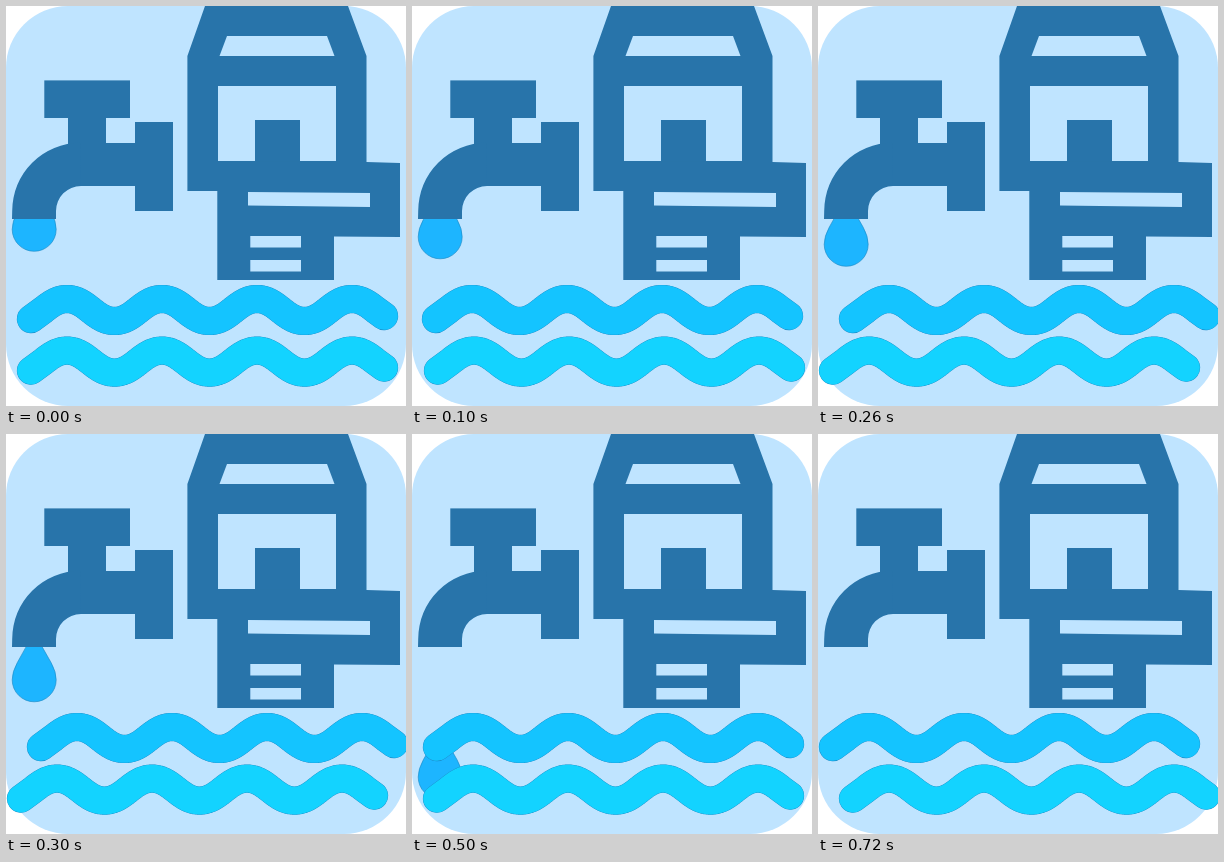
Animation of 400x400 px, one loop 800 ms. Source, as an HTML page with a canvas:

```html
<!DOCTYPE html>
<html lang="en">
<head>
<meta charset="utf-8">
<title>Water supply</title>
<style>
html, body { margin: 0; width: 100%; height: 100%; overflow: hidden; background: #fff; }
canvas { display: block; width: 400px; height: 400px; }
</style>
</head>
<body>
<canvas id="stage"></canvas>
<script>
const LOOP = 800, STEP = 100, LAST = 6;
const SKY = '#bfe4ff', STEEL = '#2874aa', EDGE = '#1c86c2';
const WAVES = [
  { mid: 304, color: '#14c4ff', sway: [0, -1, 10, 10, -1, 0, -10] },
  { mid: 355.6, color: '#13d3ff', sway: [0, 1, -10, -10, -1, 0, 10] }
];

const canvas = document.getElementById('stage');
const ctx = canvas.getContext('2d');
const ratio = window.devicePixelRatio || 1;
canvas.width = canvas.height = 400 * ratio;
ctx.scale(ratio, ratio);

function poly(color, ...xy) {
  ctx.beginPath();
  for (let i = 0; i < xy.length; i += 2) ctx.lineTo(xy[i], xy[i + 1]);
  ctx.closePath();
  ctx.fillStyle = color;
  ctx.fill();
}

function box(color, x1, y1, x2, y2) {
  ctx.fillStyle = color;
  ctx.fillRect(x1, y1, x2 - x1, y2 - y1);
}

function backdrop() {
  box('#fff', 0, 0, 400, 400);
  ctx.beginPath();
  ctx.roundRect(0, 0, 400, 400, 62);
  ctx.fillStyle = SKY;
  ctx.fill();
}

function plant() {
  poly(STEEL, 199, 0, 342, 0, 360.5, 50, 360.5, 156, 394, 157, 394, 231,
    328, 230.5, 328, 274, 211.3, 274, 211.3, 185, 181.4, 185, 181.4, 50);
  poly(SKY, 221, 30, 321, 30, 328.5, 50, 213.5, 50);
  box(SKY, 212, 80, 330, 155);
  box(STEEL, 249, 114, 294, 155.5);
  poly(SKY, 242, 186, 364, 187, 364, 201, 242, 199.5);
  for (const y of [230, 254]) box(SKY, 244.3, y, 295, y + 11.5);
}

function tap() {
  box(STEEL, 38.3, 74.4, 124, 112);
  box(STEEL, 62, 111, 100, 150);
  box(STEEL, 74, 137, 130, 180);
  box(STEEL, 129, 116, 167, 205);
  // Spout: quarter bend ending in a short straight mouth
  ctx.beginPath();
  ctx.moveTo(6, 213);
  ctx.arc(74.5, 205, 68.3, Math.PI, Math.PI * 1.5);
  ctx.arc(75, 205, 25, Math.PI * 1.5, Math.PI, true);
  ctx.lineTo(50, 213);
  ctx.closePath();
  ctx.fillStyle = STEEL;
  ctx.fill();
}

// Swells slowly at the mouth, then falls in large strides
function dropHeight(step) {
  return step < 4 ? 223.3 + 7.5 * step : 294 + 49 * (step - 4);
}

function drop(y) {
  ctx.save();
  ctx.translate(28.2, y);
  ctx.beginPath();
  ctx.moveTo(0, -47);
  ctx.lineTo(17, -17);
  ctx.quadraticCurveTo(22, -8, 22, 0);
  ctx.arc(0, 0, 22, 0, Math.PI);
  ctx.quadraticCurveTo(-22, -8, -17, -17);
  ctx.closePath();
  ctx.fillStyle = '#1db5ff';
  ctx.fill();
  ctx.strokeStyle = EDGE;
  ctx.lineWidth = 0.6;
  ctx.stroke();
  ctx.restore();
}

// Slightly flattened sine with straight ends
function wave(shift, mid, color) {
  const period = 95, crest = 61;
  ctx.beginPath();
  ctx.moveTo(25 + shift, mid + 9);
  for (let x = crest - period / 4; x <= crest + period * 3.25; x += 0.5) {
    const a = (x - crest) * 2 * Math.PI / period;
    ctx.lineTo(x + shift, mid - 11.2 * (Math.cos(a) - 0.02 * Math.cos(3 * a)));
  }
  ctx.lineTo(378 + shift, mid + 6);
  ctx.lineCap = ctx.lineJoin = 'round';
  ctx.strokeStyle = EDGE;
  ctx.lineWidth = 28.3;
  ctx.stroke();
  ctx.strokeStyle = color;
  ctx.lineWidth = 27.7;
  ctx.stroke();
}

function draw(time) {
  const step = Math.min(Math.floor(time % LOOP / STEP), LAST);
  backdrop();
  plant();
  if (step < LAST) drop(dropHeight(step));
  tap();
  for (const w of WAVES) wave(w.sway[step], w.mid, w.color);
}

const start = performance.now();
function tick() {
  draw(performance.now() - start);
  requestAnimationFrame(tick);
}
tick();
</script>
</body>
</html>
```
